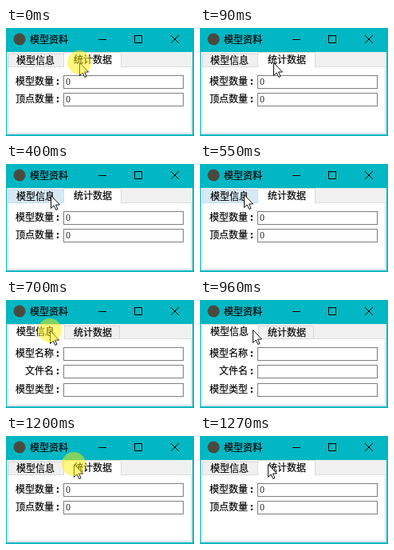
An HTML page that plays this animation: 236 px wide and 135 px high, repeating every 1430 ms.

```html
<!DOCTYPE html>
<html lang="zh-CN">
<head>
<meta charset="utf-8">
<title>模型资料</title>
<style>
html, body { margin: 0; width: 100%; height: 100%; overflow: hidden; background: #f0f0f0; }
svg { display: block; width: 236px; height: 135px; }
text { font: 12px "Noto Sans CJK SC", "Noto Sans CJK", sans-serif; fill: #000; stroke: #000; stroke-width: .2px; }
.colon { font-weight: bold; }
.value { font: 12px "Liberation Serif", serif; fill: #222; stroke: none; }
.field { fill: #fff; stroke: #7f7f7f; }
.tab { fill: #f0f0f0; stroke: #d9d9d9; }
.hover { fill: #d8e9f6; stroke: #c4dcee; }
.front { fill: #fff; stroke: #dcdcdc; }
.controls { fill: none; stroke: #000; }

/* One loop of 1430 ms; every change is a hard cut. */
#cursor, #glow, .page, .hover { animation: 1430ms step-end infinite; }
#cursor { animation-name: move; }
#glow { animation-name: click; }
#info { animation-name: info; }
#stats { animation-name: stats; }
#hoverInfo { animation-name: hover-info; }
#hoverStats { animation-name: hover-stats; }

@keyframes move {
  0% { transform: translate(92px, 43px); }
  16.08% { transform: translate(69px, 41px); }
  22.37% { transform: translate(59px, 40px); }
  27.97% { transform: translate(56px, 39px); }
  38.46% { transform: translate(55px, 38px); }
  67.13% { transform: translate(66px, 37px); }
  72.02% { transform: translate(76px, 36px); }
  77.62% { transform: translate(84px, 36px); }
  83.91%, 100% { transform: translate(85px, 35px); }
}
@keyframes click {
  0% { opacity: 1; }
  6.29% { opacity: 0; }
  48.95% { opacity: 1; }
  55.24% { opacity: 0; }
  83.91% { opacity: 1; }
  88.81%, 100% { opacity: 0; }
}
@keyframes info {
  0% { visibility: hidden; }
  48.95% { visibility: visible; }
  83.91%, 100% { visibility: hidden; }
}
@keyframes stats {
  0% { visibility: visible; }
  48.95% { visibility: hidden; }
  83.91%, 100% { visibility: visible; }
}
@keyframes hover-info {
  0% { visibility: hidden; }
  16.08% { visibility: visible; }
  48.95%, 100% { visibility: hidden; }
}
@keyframes hover-stats {
  0% { visibility: hidden; }
  72.02% { visibility: visible; }
  83.91%, 100% { visibility: hidden; }
}
</style>
</head>
<body>
<svg viewBox="0 0 236 135">
  <defs>
    <g id="row">
      <rect class="field" x="72.5" y="59.5" width="150" height="16"/>
      <text class="colon" x="63" y="71">:</text>
    </g>
  </defs>

  <!-- window frame -->
  <rect width="236" height="135" fill="#00b7c3"/>
  <rect x="1" y="30" width="233" height="103" fill="#f0f0f0"/>
  <circle cx="17" cy="14" r="7.5" fill="#4b4a40"/>
  <text x="30" y="19">模型资料</text>
  <g class="controls">
    <path d="M116 14.5h10"/>
    <rect x="161.5" y="9.5" width="9" height="9"/>
    <path d="M207 9l10 10M217 9l-10 10"/>
  </g>
  <rect x="2.5" y="48.5" width="230" height="83" fill="#fff" stroke="#dcdcdc"/>

  <g id="stats" class="page">
    <rect class="tab" x="3.5" y="32.5" width="69" height="16"/>
    <rect id="hoverInfo" class="hover" x="3.5" y="32.5" width="69" height="16"/>
    <path class="front" d="M72.5 49V30.5H144.5V49"/>
    <text x="13" y="45">模型信息</text>
    <text x="85" y="44">统计数据</text>
    <use href="#row"/>
    <use href="#row" y="22"/>
    <text x="12" y="71">模型数量</text>
    <text x="12" y="93">顶点数量</text>
    <text class="value" x="75" y="71">0</text>
    <text class="value" x="75" y="93">0</text>
  </g>

  <g id="info" class="page">
    <rect class="tab" x="73.5" y="32.5" width="69" height="16"/>
    <rect id="hoverStats" class="hover" x="73.5" y="32.5" width="69" height="16"/>
    <path class="front" d="M2.5 49V30.5H73.5V49"/>
    <text x="13" y="44">模型信息</text>
    <text x="85" y="45">统计数据</text>
    <use href="#row"/>
    <use href="#row" y="22"/>
    <use href="#row" y="45"/>
    <text x="12" y="71">模型名称</text>
    <text x="24" y="93">文件名</text>
    <text x="12" y="116">模型类型</text>
  </g>

  <g id="cursor">
    <path d="M.5 .5V16.5L4.2 13L6.8 18.5L9 17.5L6.5 12H11.5Z" fill="#fff" stroke="#111"/>
    <circle id="glow" r="15" fill="#fff000" fill-opacity=".5"/>
  </g>
</svg>
</body>
</html>
```
